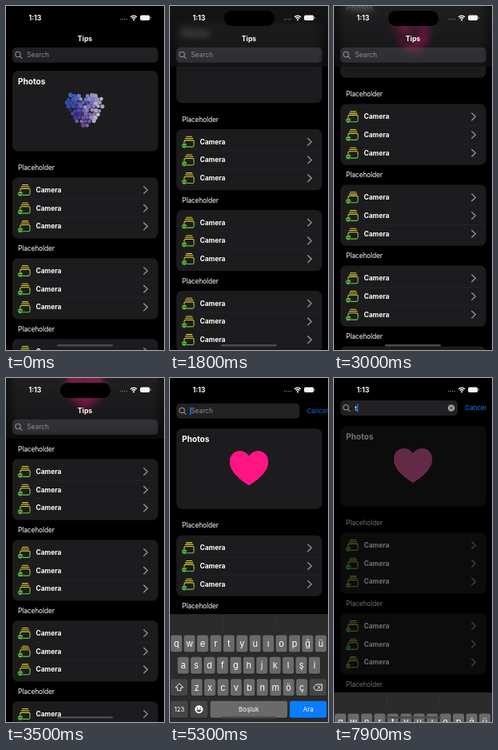
Animation of 198 by 430 pixels, one loop 8 s. Source, as an HTML page:

```html
<!DOCTYPE html>
<html lang="en">
<head>
<meta charset="utf-8">
<title>Tips</title>
<style>
  html, body { margin: 0; width: 100%; height: 100%; overflow: hidden; background: #000; }
  #stage { position: absolute; left: 0; top: 0; width: 198px; height: 430px; overflow: hidden; background: #000; }
  svg, #bar, #shade { position: absolute; left: 0; top: 0; }
  #bar, #shade { width: 198px; height: 75.5px; }
  #bar {
    background: linear-gradient(rgba(34, 34, 36, .6), rgba(16, 16, 17, .66));
    -webkit-backdrop-filter: blur(4px); backdrop-filter: blur(4px);
  }
  #shade { background: #040404; }
  text { font-family: Inter, "Liberation Sans", sans-serif; }
</style>
</head>
<body>
<div id="stage">
  <svg width="198" height="430">
    <defs>
      <linearGradient id="ink" x1="0" y1="0" x2=".5" y2="1">
        <stop offset=".3" stop-color="#dfd32b"/><stop offset="1" stop-color="#62c83f"/>
      </linearGradient>
      <path id="heart" d="M99 152C90 146 75 136 75 122.500C75 114 81 109 87.500 109C92.500 109 97 112 99 116C101 112 105.500 109 110.500 109C117 109 123 114 123 122.500C123 136 108 146 99 152Z"/>
      <clipPath id="heartClip"><use href="#heart"/></clipPath>
      <g id="icon" fill="none" stroke="url(#ink)" stroke-width="1.1" stroke-linecap="round">
        <path d="M20.500 -6.500h7M19.200 -4.200h9.600" stroke="#dfd32b"/>
        <rect x="17.800" y="-1.900" width="12.200" height="8.300" rx="1.800"/>
        <circle cx="18" cy="4.700" r="3.300" fill="#5cc53c" stroke="#1c1c1e" stroke-width=".7"/>
        <path d="M16.500 4.700h3" stroke="#12300c" stroke-width=".9"/>
      </g>
    </defs>
    <g id="page"></g>
    <rect id="dim" y="52" width="198" height="378" opacity="0"/>
  </svg>
  <div id="bar"></div>
  <div id="shade"></div>
  <svg id="chrome" width="198" height="430"></svg>
</div>
<script>
const LOOP = 8000, PINK = '#ff1681', BLUE = '#0a84ff', GRAY = '#8e8e94';
const $ = id => document.getElementById(id);
const clamp = v => Math.max(0, Math.min(1, v));
const span = (t, a, b) => clamp((t - a) / (b - a));
const smooth = v => v * v * (3 - 2 * v);
const easeOut = v => 1 - (1 - v) * (1 - v);

function add(parent, tag, attrs, content) {
  const el = document.createElementNS('http://www.w3.org/2000/svg', tag);
  set(el, attrs);
  if (content !== undefined) el.textContent = content;
  return parent.appendChild(el);
}
function set(el, attrs) {
  for (const k in attrs) el.setAttribute(k, attrs[k]);
}
// y is the middle of the line
const label = (p, str, x, y, size, weight = 400, more = {}) =>
  add(p, 'text', { x, y: y + size * .36, 'font-size': size, 'font-weight': weight, fill: '#fff', ...more }, str);
const box = (p, x, y, width, height, rx, fill) =>
  add(p, 'rect', { x, y, width, height, rx, fill });
const line = (p, d, stroke, width, more = {}) =>
  add(p, 'path', { d, stroke, 'stroke-width': width, fill: 'none', 'stroke-linecap': 'round', 'stroke-linejoin': 'round', ...more });

let seed = 11;
function rand() {
  seed = (seed * 16807) % 2147483647;
  return seed / 2147483647;
}

// ---- scrolling page ----
const page = $('page');
box(page, 8, 81, 182.5, 100.5, 7, '#1c1c1e');
label(page, 'Photos', 15, 94.3, 10.1, 700);
const art = add(page, 'g', {});
for (let s = 0; s < 5; s++) {
  const top = 101 * s;
  label(page, 'Placeholder', 15, top + 202, 8.4, 400, { 'letter-spacing': -.1 });
  box(page, 8, top + 214.3, 182.5, 76.2, 7, '#1c1c1e');
  for (let r = 0; r < 3; r++) {
    const y = top + 230 + 22.7 * r;
    add(page, 'use', { href: '#icon', y });
    label(page, 'Camera', 37.5, y, 8.4, 700);
    line(page, `M172.800 ${y - 4.3}l4.500 4.300l-4.500 4.300`, '#8a8a8f', 1.5);
    if (r < 2) line(page, `M37.500 ${y + 11.35}H190`, '#2b2b2e', .5, { 'stroke-linecap': 'butt' });
  }
}

// ---- heart of dots ----
const loose = add(art, 'g', {});
const filling = add(art, 'g', { 'clip-path': 'url(#heartClip)' });
const solid = add(art, 'use', { href: '#heart', fill: PINK });
const shape = new Path2D($('heart').getAttribute('d'));
const probe = document.createElement('canvas').getContext('2d');

// steel blue on the left, pale lilac top right, dark purple bottom left
function tone(x, y) {
  const u = clamp((x - 75) / 48 + (rand() - .5) * .4);
  const v = clamp((y - 109) / 43 + (rand() - .5) * .3);
  const light = 46 + 28 * u - 26 * v * (1 - u) + (rand() - .5) * 16;
  return `hsl(${208 + 60 * v * (1 - u) + 55 * u} ${54 - 36 * u}% ${light}%)`;
}

const dots = [];
for (let row = 0; row < 9; row++) {
  for (let col = 0; col < 10; col++) {
    const x = 76 + col * 5.2 + (row % 2) * 2.6 + (rand() - .5) * 1.4;
    const y = 112 + row * 4.6 + (rand() - .5) * 1.4;
    if (!probe.isPointInPath(shape, x, y)) continue;
    dots.push({
      x, y, size: 2.2 + rand() * .8, wait: rand(), turn: rand() * 6.28,
      el: add(loose, 'circle', { fill: tone(x, y) }),
      fill: add(filling, 'circle', { cx: x, cy: y, fill: PINK })
    });
  }
}

// leftovers: x, y, radius, colour
const sparks = (list, from, peak, hold, to) => list.map(([cx, cy, r, fill]) =>
  ({ r, from, peak, hold, to, el: add(loose, 'circle', { cx, cy, fill }) }));
const trail = [
  ...sparks([
    [82, 135, 2, '#1d5fae'], [87, 133.500, 2.200, '#2b7fd4'], [94, 135, 2.600, '#2477cc'],
    [84, 141, 1.700, '#174a86'], [93.500, 139.500, 2.300, '#2f86dc'], [109.500, 142, 2, '#d9c9cf'],
    [97, 149, 2.400, '#1b62b4'], [91.500, 147.500, 1.400, '#153f73'], [100, 149, 2, '#1f4f94'],
    [88, 140, 1.100, '#1c3f70']
  ], 700, 1000, 1250, 1750),
  ...sparks([
    [73, 129.500, 2, '#1d4a78'], [96, 127, 1.900, '#7fd0ee'], [108, 129, 1.800, '#7fd0ee'],
    [76, 137, 1.200, '#1f4f8a'], [93, 139, 2, '#3f9fe0'], [83.500, 143, .8, '#1a3558'],
    [101.500, 145.500, .9, '#d5e6f0'], [86, 136, .6, '#1a3558']
  ], 3750, 3950, 4150, 4500)
];

function drawHeart(t) {
  for (const d of dots) {
    const gone = span(t, 480 + d.wait * 420, 760 + d.wait * 420);
    const sway = .9 * span(t, 0, 600);
    set(d.el, {
      cx: d.x + Math.cos(d.turn + t / 260) * sway,
      cy: d.y + Math.sin(d.turn + t / 260) * sway,
      r: d.size * (1 - smooth(gone))
    });
    const grow = t < 3450 ? span(t, 2600 + d.wait * 350, 3100 + d.wait * 350)
      : t < 4300 ? 1 - span(t, 3540 + d.wait * 180, 3750 + d.wait * 200)
      : span(t, 4450 + d.wait * 300, 4850 + d.wait * 300);
    set(d.fill, { r: 5.5 * smooth(grow) });
  }
  for (const s of trail) {
    set(s.el, { r: s.r * smooth(span(t, s.from, s.peak)) * (1 - smooth(span(t, s.hold, s.to))) });
  }
  const whole = (t >= 3400 && t < 3540) || t >= 5150;
  const pale = span(t, 7100, 7900);
  set(solid, {
    visibility: whole ? 'visible' : 'hidden',
    fill: `hsl(${332 - 3 * pale} ${100 - 30 * pale}% ${54 + 9 * pale}%)`
  });
}

// ---- status bar, title, search field ----
const chrome = $('chrome');
box(chrome, 68, 6, 63, 19, 9.5, '#000');
label(chrome, '1:13', 28.5, 15, 8.6, 700);
for (let i = 0; i < 4; i++) add(chrome, 'circle', { cx: 143.5 + i * 2.6, cy: 16.6, r: .75, fill: '#77777a' });
line(chrome, 'M156 13.800a6 6 0 0 1 8 0M157.600 15.600a3.600 3.600 0 0 1 4.800 0', '#fff', 1.3, { 'stroke-linecap': 'butt' });
add(chrome, 'circle', { cx: 160, cy: 17.3, r: 1.1, fill: '#fff' });
box(chrome, 168, 11.5, 12.2, 6.6, 2, '#f4f4f4');
box(chrome, 180.8, 13.6, 1, 2.4, .5, '#8a8a8a');
const title = label(chrome, 'Tips', 99, 41.2, 8.6, 700, { 'text-anchor': 'middle' });

const field = add(chrome, 'g', {});
const fieldBox = box(field, 8, -9.5, 182.5, 19, 5, 'rgba(118,118,128,.28)');
add(field, 'circle', { cx: 15, cy: -.8, r: 3.2, fill: 'none', stroke: GRAY, 'stroke-width': 1.1 });
line(field, 'M17.400 1.600l2.500 2.500', GRAY, 1.1);
const hint = label(field, 'Search', 26.3, 0, 8.3, 400, { fill: GRAY });
const typed = label(field, 't', 26, 0, 8.6);
const caret = box(field, 25, -5, 1.3, 10, .5, BLUE);
const clear = add(field, 'g', {});
add(clear, 'circle', { cx: 147, cy: 0, r: 4.3, fill: '#a0a0a6' });
line(clear, 'M145.400 -1.600l3.200 3.200M148.600 -1.600l-3.200 3.200', '#1c1c1e', .9);
const cancel = label(field, 'Cancel', 0, 0, 8.1, 400, { fill: BLUE });

// ---- keyboard ----
const keys = add(chrome, 'g', {});
box(keys, 0, 0, 198, 175, 0, '#2b2b2c');
line(keys, 'M66.500 6v12M132 6v12', '#3c3c3e', .6);
function key(x, y, w, str, size = 11, fill = '#6a6a6b') {
  box(keys, x, y - 9.6, w, 21, 2.5, '#18181a');
  box(keys, x, y - 10.4, w, 21, 2.5, fill);
  if (str) label(keys, str, x + w / 2, y, size, 400, { 'text-anchor': 'middle' });
}
[['qwertyuıopğü', 1, 36.7], ['asdfghjklşi', 9.5, 64.1], ['zxcvbnmöç', 26.5, 91.5]].forEach(([letters, x, y]) =>
  [...letters].forEach((c, i) => key(x + i * 16.45, y, 14, c)));
key(1, 91.5, 21, '', 0, '#464647');
line(keys, 'M11.500 87l-4.600 4.700h2.500v3.800h4.200v-3.800h2.500z', '#fff', .9);
key(175, 91.5, 21, '', 0, '#464647');
line(keys, 'M180 91.500l3.200 -3.700h7.300v7.400h-7.300zM185 89.800l3.400 3.400M188.400 89.800l-3.400 3.400', '#fff', .9);
key(1, 119, 21.5, '123', 8, '#464647');
key(25.5, 119, 21.5, '', 0, '#464647');
add(keys, 'circle', { cx: 36.3, cy: 119, r: 5, fill: '#fff' });
line(keys, 'M34.500 117.300v.4M38.100 117.300v.4', '#464647', 1.2);
line(keys, 'M33.600 120.200a2.900 2.900 0 0 0 5.400 0z', '#464647', .8, { fill: '#464647' });
key(50.5, 119, 96.5, 'Boşluk', 8);
key(150, 119, 46.3, 'Ara', 8, '#0a7cff');

box(chrome, 64, 423, 70, 2.6, 1.3, '#4c4c4e');

// ---- timeline ----
const scrollSteps = [[0, 0], [700, 0], [1200, 57], [2400, 63.5], [3500, 113], [4100, 46], [4650, 0], [LOOP, 0]];
function scrollAt(t) {
  const i = scrollSteps.findIndex(s => s[0] > t);
  const [t0, a] = scrollSteps[i - 1], [t1, b] = scrollSteps[i];
  return a + (b - a) * smooth(span(t, t0, t1));
}

const TYPE = 6600;
function draw(t) {
  const scroll = scrollAt(t);
  const open = easeOut(span(t, 5000, 5500));
  const shut = easeOut(span(t, 7650, 8120));
  const hasText = t >= TYPE;

  page.setAttribute('transform', `translate(0 ${-scroll - 21 * open})`);
  // the header is black near the top and turns to glass further down
  $('bar').style.visibility = $('shade').style.visibility = scroll > 0 ? 'visible' : 'hidden';
  $('shade').style.opacity = 1 - span(scroll, 46, 56);
  title.setAttribute('opacity', 1 - span(t, 5000, 5180));

  const cancelX = 164 + 47 * (1 - open);
  field.setAttribute('transform', `translate(0 ${61.3 - 23.8 * open})`);
  fieldBox.setAttribute('width', Math.min(182.5, cancelX - 17));
  set(cancel, { x: cancelX, opacity: open });
  hint.setAttribute('opacity', hasText ? 0 : 1);
  typed.setAttribute('opacity', hasText ? 1 : 0);
  clear.setAttribute('opacity', hasText ? 1 : 0);
  const since = t - (hasText ? TYPE : 5200);
  set(caret, { x: hasText ? 28.9 : 25, opacity: since >= 0 && since % 1000 < 550 ? 1 : 0 });

  keys.setAttribute('transform', `translate(0 ${260 + 222 * (1 - open) + 170 * shut})`);
  $('dim').setAttribute('opacity', .56 * span(t, 7600, 7900));
  drawHeart(t);
}

function tick() {
  draw(performance.now() % LOOP);
  requestAnimationFrame(tick);
}
tick();
</script>
</body>
</html>
```
